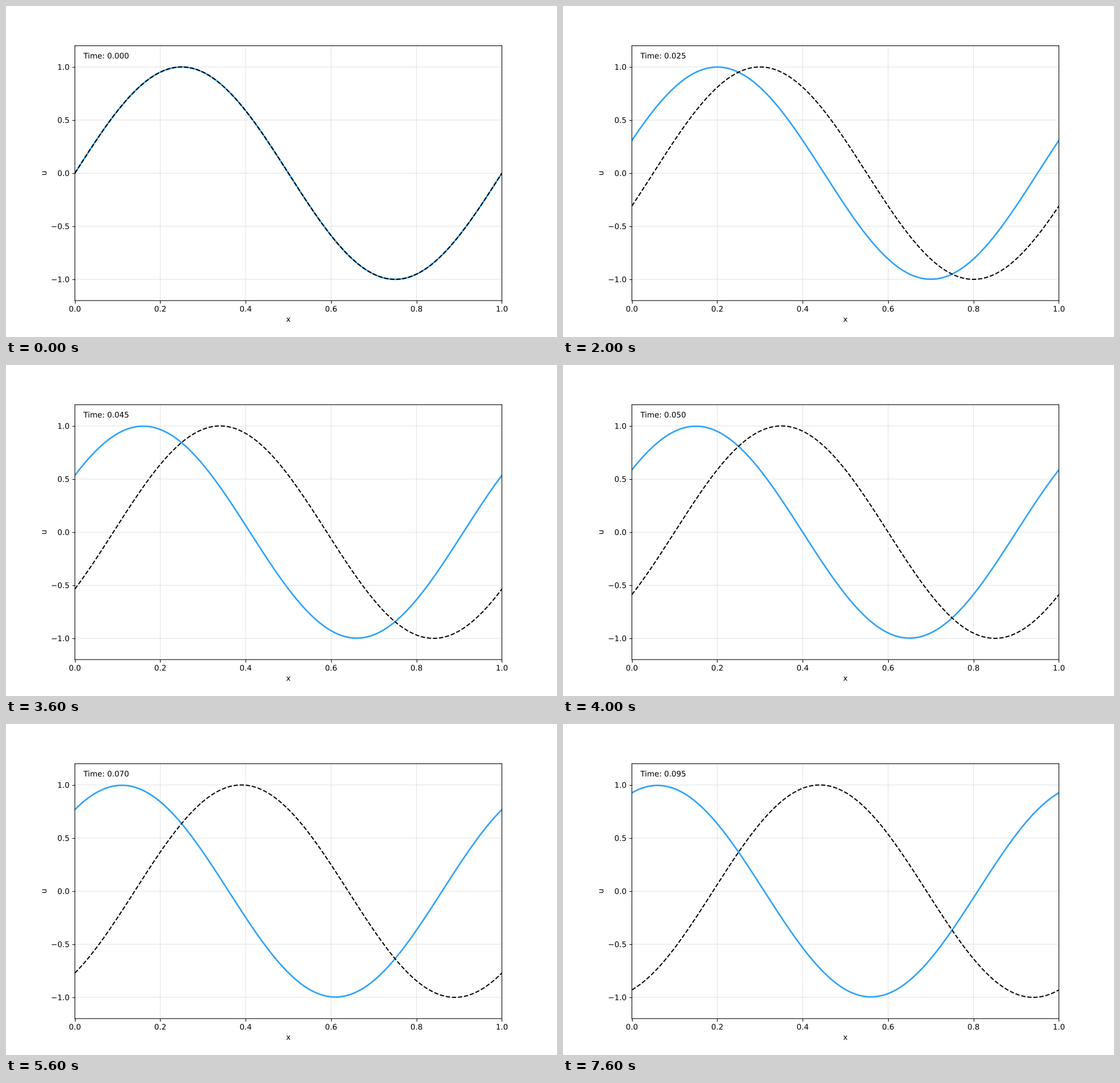
Recreate the animation shown at these times as a matplotlib script. Size 966 px wide and 580 px high, loop 8000 ms.

```python
import matplotlib.pyplot as plt
import numpy as np
from matplotlib import patheffects
from matplotlib.animation import FuncAnimation

DPI = 96.6
WIDTH, HEIGHT = 966, 580
FRAMES, INTERVAL = 20, 400
TIME_STEP = 0.005
SPEED = 2.0
DAMPING = 0.045

# Smooth subpixel placement: no line snapping, text drawn as outlines.
plt.rcParams.update({
    "font.family": "DejaVu Sans",
    "path.snap": False,
    "path.effects": [patheffects.Normal()],
    "text.hinting": "none",
})

# The tiny offset keeps the pixel size from being truncated.
fig, ax = plt.subplots(
    figsize=((WIDTH + 1e-6) / DPI, (HEIGHT + 1e-6) / DPI), dpi=DPI
)
ax.set(xlim=(0, 1), ylim=(-1.2, 1.2), xlabel="x", ylabel="u")
ax.grid(True, alpha=0.35)

x = np.linspace(0, 1, 201)
left_wave, = ax.plot([], [], color="#2ea3fc", lw=2)
right_wave, = ax.plot([], [], color="black", lw=1.5, ls="--")
clock = ax.text(0.02, 0.95, "", transform=ax.transAxes)


def wave(shift):
    return np.sin(2 * np.pi * (x - shift))


def update(frame):
    t = frame * TIME_STEP
    left_wave.set_data(x, np.exp(-DAMPING * t) * wave(-SPEED * t))
    right_wave.set_data(x, wave(SPEED * t))
    clock.set_text(f"Time: {t:.3f}")
    return left_wave, right_wave, clock


anim = FuncAnimation(
    fig, update, frames=FRAMES, interval=INTERVAL, repeat=True, repeat_delay=0
)
plt.show()
```
